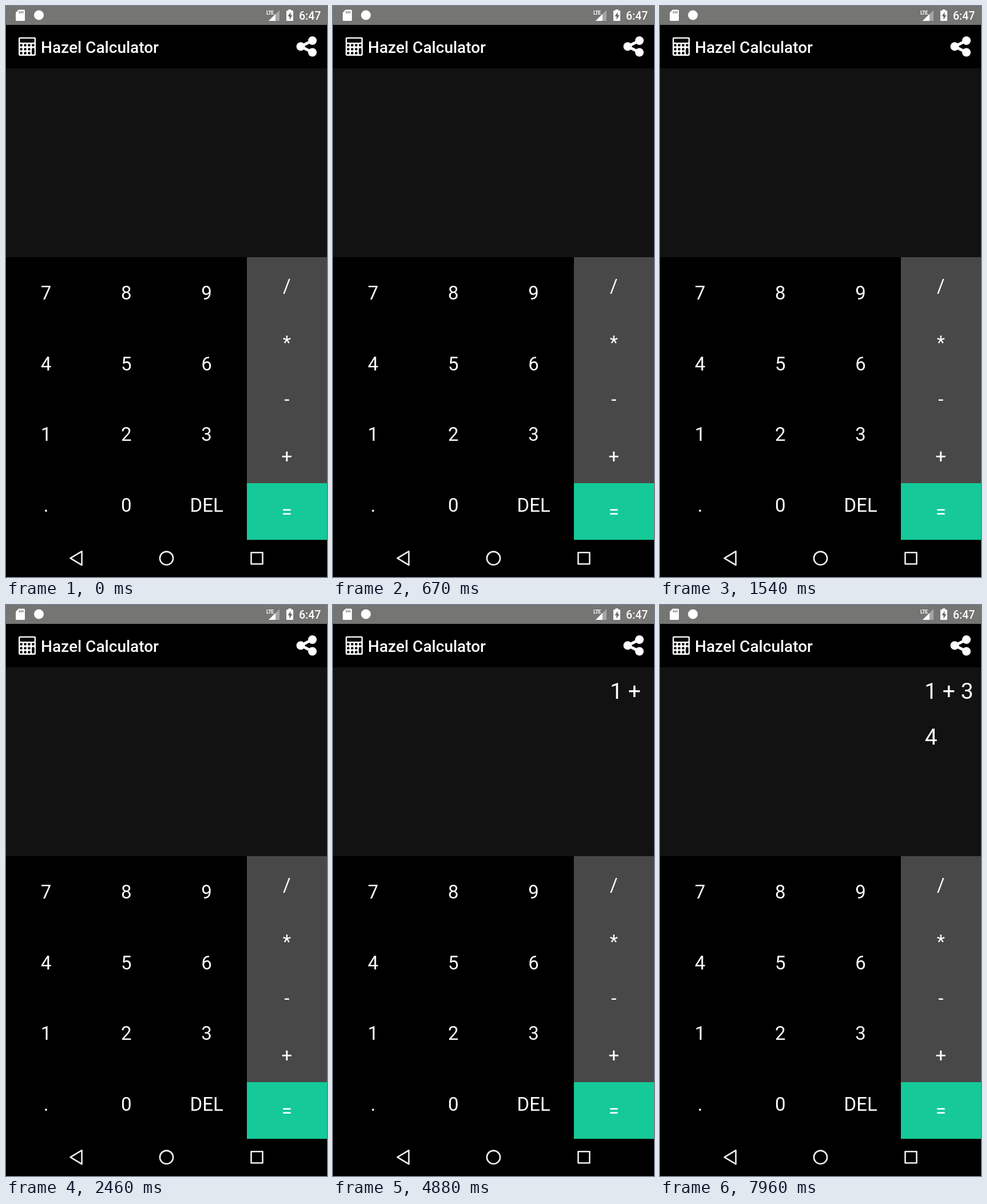
Recreate the animation shown at these times as an HTML page. Size 561 by 998 pixels, loop 8000 ms.

```html
<!DOCTYPE html>
<html lang="en">
<head>
<meta charset="utf-8">
<title>Calculator</title>
<style>
html, body { margin: 0; width: 100%; height: 100%; overflow: hidden; background: #000; }
svg { display: block; font-family: Roboto, "Liberation Sans", sans-serif; fill: #fff; }
text { white-space: pre; }
.key { font-size: 33px; text-anchor: middle; }
.out { font-size: 39px; }
.nav { fill: none; stroke: #eee; stroke-width: 2.6; stroke-linejoin: round; }
</style>
</head>
<body>
<svg id="stage" width="561" height="998" viewBox="0 0 561 998">
  <rect width="561" height="998" fill="#000"/>

  <!-- status bar -->
  <rect width="561" height="33" fill="#757574"/>
  <path d="M22 6.5h9.5q1.5 0 1.5 1.5v16.500q0 1.500-1.500 1.500h-13q-1.500 0-1.500-1.500v-13z"/>
  <path d="M23.500 9v4M26.500 9v4M29.500 9v4" stroke="#757574" stroke-width="1.500"/>
  <circle cx="57.500" cy="16" r="8.500"/>
  <text x="455" y="15" font-size="9" font-weight="700" letter-spacing="-.7">LTE</text>
  <path d="M478 7v19h-19z" fill="#a5a5a5"/>
  <path d="M471 14v12h-12z"/>
  <path d="M493.500 8v-2h5v2h3.500v18h-12v-18z"/>
  <path d="M497.500 10.500l-5 7.500h3v6l5-8h-3z" fill="#666"/>
  <text x="512" y="24" font-size="19.500" font-weight="500">6:47</text>

  <!-- app bar -->
  <g id="calc" transform="translate(22 54.700) scale(.01803)">
    <rect width="1664" height="1792" rx="120"/>
    <rect x="128" y="128" width="1408" height="384" rx="64" fill="#000"/>
    <rect x="1280" y="1024" width="256" height="640" rx="128" fill="#000"/>
  </g>
  <text x="61" y="81.500" font-size="28" font-weight="500">Hazel Calculator</text>
  <path d="M535.500 60.500l-20.500 10.300l20.500 10.300" fill="none" stroke="#fff" stroke-width="5"/>
  <circle cx="535.500" cy="60.500" r="7.500"/>
  <circle cx="515" cy="70.800" r="7.500"/>
  <circle cx="535.500" cy="81" r="7.500"/>

  <!-- display and operator column -->
  <rect y="109" width="561" height="330" fill="#121213"/>
  <rect x="421" y="439" width="140" height="395" fill="#484849"/>
  <rect x="421" y="834" width="140" height="99" fill="#16c998"/>
  <text id="sum" class="out" x="547.600" y="164" text-anchor="end"></text>
  <text id="result" class="out" x="462.800" y="243.500"></text>

  <!-- navigation bar -->
  <g class="nav">
    <path d="M112.500 965.200l20-12v24z"/>
    <circle cx="280.500" cy="965.200" r="11.600"/>
    <rect x="428.500" y="955.200" width="20" height="20"/>
  </g>
</svg>
<script>
const LOOP = 8000, HOLD = 110, FADE = 250, DIM = 0.2;
const presses = [["1", 2550], ["+", 3840], ["3", 4880], ["=", 6420]];
const $ = id => document.getElementById(id);
const keys = {};

function add(parent, tag, attrs) {
  const el = document.createElementNS("http://www.w3.org/2000/svg", tag);
  for (const name in attrs) el.setAttribute(name, attrs[name]);
  return parent.appendChild(el);
}

function addColumn(labels, col) {
  const rowHeight = 494 / labels.length;
  labels.forEach((label, row) => {
    const y = 439 + rowHeight * (row + 0.5) + 12.7;
    keys[label] = add($("stage"), "text", { class: "key", x: 140.25 * (col + 0.5), y });
    keys[label].textContent = label;
  });
}

[["7", "4", "1", "."], ["8", "5", "2", "0"], ["9", "6", "3", "DEL"], ["/", "*", "-", "+", "="]]
  .forEach(addColumn);

// round keys of the app icon; the last column has one tall key below
for (let row = 0; row < 3; row++)
  for (let col = 0; col < (row ? 3 : 4); col++)
    add($("calc"), "circle", { cx: 256 + 384 * col, cy: 768 + 384 * row, r: 128, fill: "#000" });

const ease = p => p < 0.5 ? 2 * p * p : 1 - 2 * (1 - p) * (1 - p);

// a touched label dims, then recovers after release
function opacity(age) {
  if (age < 0 || age > HOLD + FADE) return 1;
  const dim = age < HOLD ? ease(age / HOLD) : 1 - ease((age - HOLD) / FADE);
  return 1 - (1 - DIM) * dim;
}

function draw(now) {
  const t = now % LOOP;
  const typed = presses.map(([label, at]) => {
    keys[label].setAttribute("opacity", opacity(t - at));
    return t >= at + HOLD ? label : "";
  });
  const [a, op, b, equals] = typed;
  // non-breaking spaces keep the right edge fixed while typing
  $("sum").textContent = a && `${a}\u00a0${op}\u00a0${b}`;
  $("result").textContent = equals && Number(a) + Number(b);
  requestAnimationFrame(draw);
}
draw(performance.now());
</script>
</body>
</html>
```
